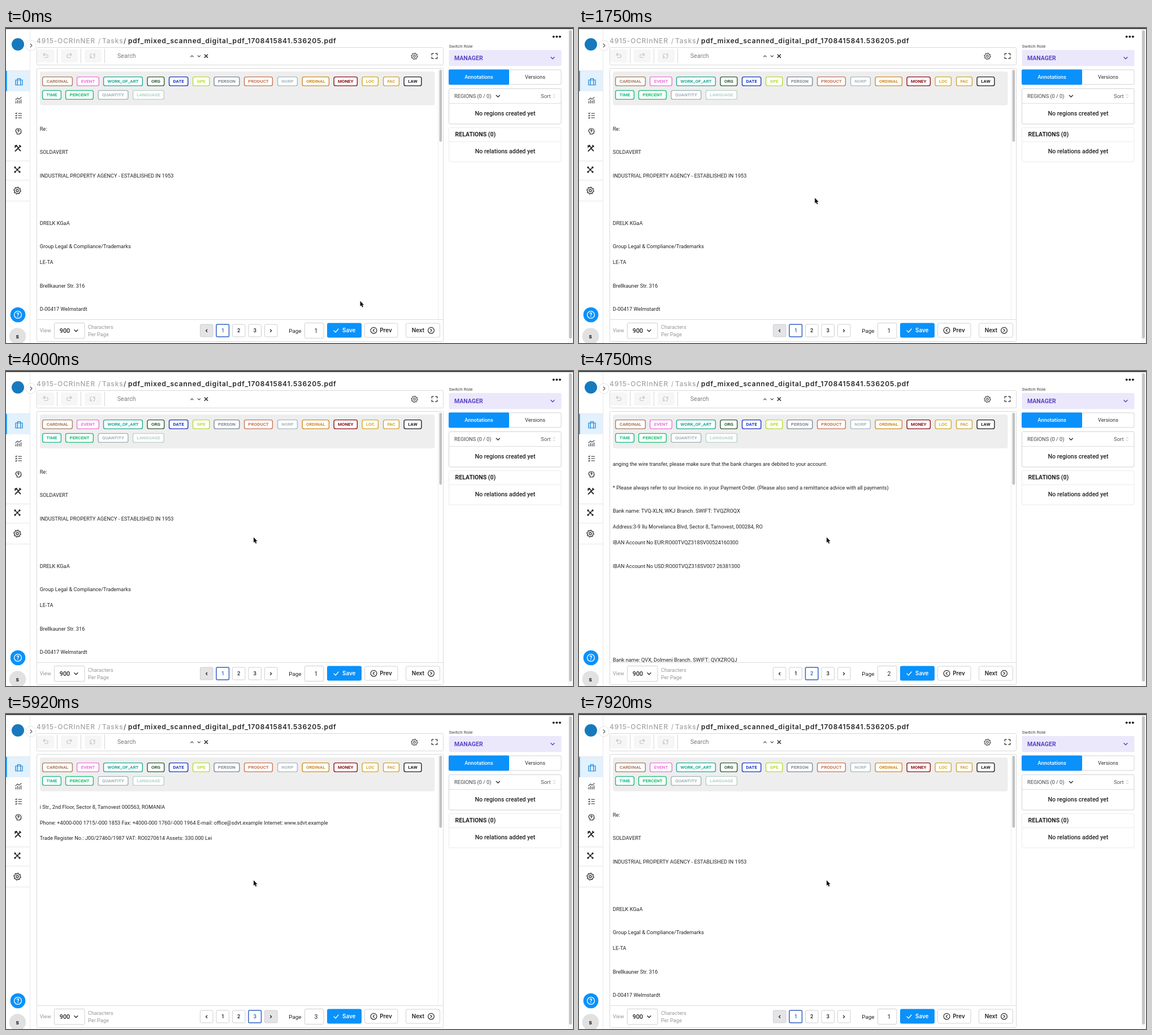
An HTML page that plays this animation: 1003x558 px, repeating every 8000 ms.

```html
<!DOCTYPE html>
<html lang="en">
<head>
<meta charset="utf-8">
<title>Document annotation</title>
<style>
html, body { margin: 0; width: 100%; height: 100%; overflow: hidden; background: #fff; }
svg { display: block; width: 100%; height: 100%; }
text { font-family: Roboto, sans-serif; font-size: 9.23px; fill: #222; white-space: pre; }
.inter { font-family: Inter, sans-serif; }
.crumb { font-size: 12px; letter-spacing: .8px; }
</style>
</head>
<body>
<svg id="stage" viewBox="0 0 1003 558"></svg>
<script>
const LOOP = 8000, FPS = 12;
const BLUE = '#0a91fb', INK = '#25252b';

// Markup helpers
const box = (x, y, w, h, fill = '#fff', stroke = 'none', r = 0, sw = 1, id = '') =>
  `<rect id="${id}" x="${x}" y="${y}" width="${w}" height="${h}" rx="${r}" fill="${fill}" stroke="${stroke}" stroke-width="${sw}"/>`;
const dot = (x, y, r, fill, extra = '') => `<circle cx="${x}" cy="${y}" r="${r}" fill="${fill}" ${extra}/>`;
const line = (d, color = '#dedede', sw = 1) =>
  `<path d="${d}" fill="none" stroke="${color}" stroke-width="${sw}" stroke-linecap="round" stroke-linejoin="round"/>`;
const icon = (x, y, d, color = INK, sw = 1.2) => `<g transform="translate(${x} ${y})">${line(d, color, sw)}</g>`;
const label = (x, y, s, style = '', cls = '', id = '') =>
  `<text id="${id}" x="${x}" y="${y}" class="${cls}" style="${style}">${String(s).replace(/&/g, '&amp;')}</text>`;
const mid = (x, y, s, style = '', cls = '', id = '') => label(x, y, s, 'text-anchor:middle;' + style, cls, id);
const ring = r => `M${-r} 0a${r} ${r} 0 1 0 ${2 * r} 0a${r} ${r} 0 1 0 ${-2 * r} 0`;

const DOWN = 'M-3-1.5 0 1.5 3-1.5', CHECK = 'M-4 0-1 3 4-3';

function gear(x, y, r, color, sw) {
  let d = '';
  for (let i = 0; i < 32; i++) {
    const a = (i + .5) * Math.PI / 16, q = r * (i % 4 < 2 ? 1 : .78);
    d += `${i ? 'L' : 'M'}${(q * Math.cos(a)).toFixed(2)} ${(q * Math.sin(a)).toFixed(2)}`;
  }
  return icon(x, y, d + 'Z' + ring(r * .33), color, sw);
}

function sidebar() {
  const grey = '#55565e';
  return line('M42.5 3V558', '#e9e9ec') +
    box(0, 76, 42, 36, '#e2f1fe') + box(0, 76, 1.6, 36, BLUE) +
    line('M0 75.5H42M0 235.5H42M0 269.5H42M0 306.5H42', '#e6e6e9') +
    dot(21, 29, 11, '#1779bd') +
    dot(44, 31, 9, '#fff', 'stroke="#e2e2e5"') + icon(44.5, 31, 'M-1.5-3 1.5 0-1.5 3', '#555', 1.1) +
    icon(23, 95, 'M-6-3H6V6H-6ZM-2.5-3V-5.5H2.5V-3M-2.7-3V6M2.7-3V6', '#1580d2', 1.2) +
    icon(22, 128, 'M-4.5 5V2M-1.5 5V0M1.5 5V1M4.5 5V-1M-5-1-1.5-4 1-2 5-5', grey, 1.4) +
    icon(22, 155, 'M-5-4-4-3-2.8-4.7M0-3.7H5.5M-5 0-4 1-2.8-.7M0 0H5.5M-5 4-4 5-2.8 3.3M0 4H5.5', INK, 1.1) +
    icon(22, 183, 'M-2.5 5V2.5C-7-1-4-5 0-5C4-5 5-2 4.5 0L5 1.7 4 2V4H2V5ZM0 1V0C2-1 1.5-3 0-3C-1-3-1.5-2-1-1', INK, 1.2) +
    icon(21, 213, 'M-4.5 5 4.5-4M-5-4.5-3-5 0-1.5M1.5 1.5 4.5 4.5M-5-2-2-5M3-5 5-3', INK, 1.8) +
    icon(20, 251, 'M-4-4 0 0 4-4M0 0-4 4M0 0 4 4', INK, 1.1) +
    [[-4, -4], [4, -4], [-4, 4], [4, 4], [0, 0]].map(([x, y]) => dot(20 + x, 251 + y, 1.7, INK)).join('') +
    gear(20, 288, 6.2, INK, 1.2) +
    dot(21, 508, 13.3, BLUE) + dot(21, 508, 6.4, 'none', 'stroke="#fff" stroke-width="1.3"') +
    mid(21, 511.6, '?', 'font-size:10px;font-weight:700;fill:#fff') +
    dot(20.5, 546, 14.8, '#e1e1e1') + mid(20.3, 550, 's', 'font-size:10.5px;font-weight:700');
}

function toolbar() {
  const pale = '#c3c3c6';
  return label(54, 27, '4915-OCRInNER', 'fill:#a3a3a8;font-weight:500', 'inter crumb') +
    label(163, 27, '/', 'fill:#a3a3a8', 'inter crumb') +
    label(170, 27, 'Tasks', 'fill:#a3a3a8;font-weight:500', 'inter crumb') +
    label(208, 27, '/', 'fill:#333', 'inter crumb') +
    label(216, 27, 'pdf_mixed_scanned_digital_pdf_1708415841.536205.pdf', 'fill:#26262b;font-weight:600', 'inter crumb') +
    box(54.5, 34.5, 719, 31, '#fff', '#d9d9db', 2) +
    [55.5, 97, 139].map(x => box(x, 38, 30, 23, '#f6f6f7', 'none', 3)).join('') +
    line('M90.5 37V62M132.5 37V62M174.5 37V62', '#d5d5d8') +
    icon(70, 49, 'M-1.5-4.5-4-2-1.5.5M-4-2H1.5a2.7 2.7 0 0 1 0 5.5H-2', pale, 1.1) +
    icon(112, 49, 'M1.5-4.5 4-2 1.5.5M4-2H-1.5a2.7 2.7 0 0 0 0 5.5H2', pale, 1.1) +
    icon(153, 49.5, 'M-1-4C-5-3-5 2-2 3.5M-4.2 3.5H-2V1.2M1 4C5 3 5-2 2-3.5M4.2-3.5H2V-1.2', pale, 1.1) +
    label(197, 53.3, 'Search', 'font-size:10.6px;fill:#7b7b80') +
    icon(329, 50, 'M-2.2 1.1 0-1.1 2.2 1.1', '#444', 1.2) +
    icon(341.5, 50, 'M-2.2-1.1 0 1.1 2.2-1.1', '#444', 1.2) +
    icon(354, 49.7, 'M-2.7-2.7 2.7 2.7M2.7-2.7-2.7 2.7', '#333', 1.5) +
    gear(722.5, 50, 5.6, '#444', 1.1) +
    icon(758, 49.7, 'M-4.7-1.7V-4.5H-1.7M1.7-4.5H4.7V-1.7M4.7 1.7V4.5H1.7M-1.7 4.5H-4.7V1.7', '#333', 1.3);
}

// Label, left edge, width, colour
const TAGS = [
  [['CARDINAL', 64, 54, '#a77c61'], ['EVENT', 125, 40, '#ec74d9'], ['WORK_OF_ART', 172, 70, '#20a996'],
   ['ORG', 249.5, 31, '#315c37'], ['DATE', 288, 34.5, '#1936c4'], ['GPE', 330, 30.5, '#b6dc30'],
   ['PERSON', 367.5, 46, '#7d8995'], ['PRODUCT', 421, 51, '#c87553'], ['NORP', 480, 36, '#a9b8be'],
   ['ORDINAL', 523.5, 48.5, '#cf8b22'], ['MONEY', 579.5, 42.5, '#8c1016'], ['LOC', 629.5, 29.5, '#d2aa22'],
   ['FAC', 667, 29, '#cfa236'], ['LAW', 703.5, 32, '#202026']],
  [['TIME', 64, 34, '#18b988'], ['PERCENT', 105, 50, '#17c071'], ['QUANTITY', 162.5, 54, '#a1b1b7'],
   ['LANGUAGE', 224, 56, '#b7d2c8']]
];

const tags = () => box(60, 77, 698.5, 60, '#eeeeee', 'none', 4) +
  TAGS.map((row, i) => row.map(([name, x, w, color]) =>
    box(x + .6, 86.6 + 24 * i, w - 1.2, 15.8, '#fff', color, 3, 1.4) +
    mid(x + w / 2, 97.4 + 24 * i, name, `font-size:8px;font-weight:700;fill:${color}`)).join('')).join('');

// Row number and text for every page
const PAGES = [
  [[1, 'Re:'], [4, 'SOLDAVERT'], [7, 'INDUSTRIAL PROPERTY AGENCY - ESTABLISHED IN 1953'], [13, 'DRELK KGaA'],
   [16, 'Group Legal & Compliance/Trademarks'], [18, 'LE-TA'], [21, 'Brellkauner Str. 316'], [24, 'D-00417 Welmstardt']],
  [[0, 'anging the wire transfer, please make sure that the bank charges are debited to your account.'],
   [3, '* Please always refer to our Invoice no. in your Payment Order. (Please also send a remittance advice with all payments)'],
   [6, 'Bank name: TVQ-XLN, WKJ Branch. SWIFT: TVQZROQX'],
   [8, 'Address:3-9 Ilu Morvelanca Blvd, Sector 8, Tarnovest, 000284, RO'],
   [10, 'IBAN Account No EUR:RO00TVQZ318SV00524160300'],
   [13, 'IBAN Account No USD:RO00TVQZ318SV007 26381300'],
   [25, 'Bank name: QVX, Dolmeni Branch. SWIFT: QVXZROQJ']],
  [[0, 'i Str., 2nd Floor, Sector 8, Tarnovest 000563, ROMANIA'],
   [2, 'Phone: +4000-000 1715/-000 1853 Fax: +4000-000 1760/-000 1964 E-mail: office@sdvt.example Internet: www.sdvt.example'],
   [4, 'Trade Register No.: J00/27460/1987 VAT: RO0270614 Assets: 330.000 Lei']]
];

const pages = () => PAGES.map((rows, i) => `<g id="page${i + 1}" clip-path="url(#view)">` +
  rows.map(([n, s]) => label(59.7, (167.8 + 13.9 * n).toFixed(1), s)).join('') + '</g>').join('');

function viewer() {
  return box(54.5, 71.5, 719, 484, '#fff', '#d9d9db', 2) + tags() + pages() +
    line('M764.5 72V516', '#eeeeee') + box(766.5, 74, 4.6, 127.5, '#c2c2c4', 'none', 2.3);
}

// Buttons 0 and 4 are the previous and next arrows
function pagerButton(n) {
  const x = 343.5 + 28.5 * n, cx = x + 11.2;
  const face = n % 4
    ? mid(cx, 539.2, n, 'font-size:8.6px;font-weight:600', 'inter', 'num' + n)
    : icon(cx, 536.2, n ? 'M-1-2 1 0-1 2' : 'M1-2-1 0 1 2', '#222', 1.3);
  return box(x, 525, 22.5, 22, '#fff', '#cfcfd3', 2, 1, 'btn' + n) + face;
}

function footer() {
  const grey = 'fill:#97979c', bold = 'font-size:9.9px;font-weight:600';
  return line('M55 516.5H773', '#dcdcde') +
    label(59.7, 539.4, 'View', grey) +
    box(85.5, 522.5, 53.5, 27.5, '#fff', '#cfcfd3', 2) + label(94.8, 540, '900', 'font-size:10.8px;font-weight:500') +
    icon(124, 536.3, DOWN, '#333', 1.5) +
    label(145, 533, 'Characters', grey) + label(145, 546, 'Per Page', grey) +
    [0, 1, 2, 3, 4].map(pagerButton).join('') +
    label(500.3, 539.5, 'Page', 'font-size:9.8px') +
    box(528.5, 522.5, 33.5, 27, '#fff', '#cfcfd3', 2) +
    mid(548.5, 540, 1, 'font-size:10.6px', '', 'current') +
    box(568, 522.5, 61, 26, BLUE, 'none', 3) + icon(584, 536, CHECK, '#fff', 1.3) +
    label(595, 539.3, 'Save', bold + ';fill:#fff', 'inter') +
    box(634.5, 523, 58.5, 25, '#fff', '#d2d2d6', 3) +
    icon(650.5, 535.7, ring(5.4) + 'M1-2.2-1.2 0 1 2.2', INK, 1.2) + label(661.2, 539.3, 'Prev', bold, 'inter') +
    box(707.5, 523, 60, 25, '#fff', '#d2d2d6', 3) +
    label(717.7, 539.3, 'Next', bold, 'inter') + icon(752, 535.7, ring(5.4) + 'M-1-2.2 1.2 0-1 2.2', INK, 1.2);
}

function panel() {
  const head = 'font-size:10.6px;font-weight:500', violet = '#5a45c4';
  return [968.7, 974.3, 979.9].map(x => dot(x, 15.3, 1.9, '#111')).join('') +
    label(783.5, 35.3, 'Switch Role', 'font-size:8.1px;fill:#444') +
    box(783.5, 39, 199, 28.5, '#ebe8fc', 'none', 2) +
    label(793, 56.8, 'MANAGER', `font-size:10.5px;font-weight:600;fill:${violet}`) +
    icon(967, 53.3, DOWN, violet, 1.5) +
    box(783.5, 74, 198.5, 26, '#fff', '#d2d2d6', 2) + box(783, 73.5, 107, 27, BLUE, 'none', 2) +
    mid(836.6, 90.3, 'Annotations', 'font-size:9.3px;font-weight:500;fill:#fff') +
    mid(936, 90.3, 'Versions', 'font-size:9.3px;fill:#333') +
    box(783.5, 107.5, 198.5, 62.5, '#fff', '#d2d2d6', 2) + line('M784 133.5H982', '#dedee1') +
    label(793, 123.8, 'REGIONS (0 / 0)', 'fill:#444') + icon(870.3, 120.7, DOWN, '#333', 1.5) +
    label(946, 123.8, 'Sort', 'font-size:9.5px;fill:#555') +
    icon(969.7, 120.5, 'M-1.5-1.5 0-3 1.5-1.5M-1.5 1.5 0 3 1.5 1.5', '#aaa', .8) +
    mid(883, 155.2, 'No regions created yet', head) +
    box(783.5, 176.5, 198.5, 60.5, '#fff', '#ebebed', 2) + line('M784 201.5H982', '#ebebed') +
    label(794.6, 191.8, 'RELATIONS (0)', 'font-size:10.5px;font-weight:600') +
    mid(883, 222.2, 'No relations added yet', head);
}

const stage = document.getElementById('stage');
stage.innerHTML = '<defs><clipPath id="view"><rect x="55" y="137" width="710" height="379"/></clipPath></defs>' +
  box(0, 0, 1003, 558) + sidebar() + toolbar() + viewer() + footer() + panel() +
  box(994, 2, 9, 556, '#f8f8f8') + box(996, 4, 5, 546, '#c4c4c6', 'none', 2.5) +
  box(0, 0, 1003, 1.8, '#38383b') +
  '<path id="cursor" d="M0 0V9.6L2.1 7.7 3.7 11.2 5.4 10.4 3.8 7H6.7Z" fill="#111" stroke="#fff" stroke-width="1" paint-order="stroke"/>';

const get = id => document.getElementById(id);
const attr = (id, name, value) => get(id).setAttribute(name, value);

// Cursor stops: step, x, y, easing towards the stop
const smooth = u => u * u * (3 - 2 * u), linear = u => u, easeOut = u => u * (2 - u);
const STOPS = [[0, 626.5, 483.5], [10, 236, 335, smooth], [13, 278, 323.5, linear], [20, 401, 306, linear], [24, 438, 294.5, easeOut]];

function cursorAt(step) {
  const i = STOPS.findIndex(s => s[0] > step);
  if (i < 0) return STOPS[STOPS.length - 1].slice(1, 3);
  const [a, ax, ay] = STOPS[i - 1], [b, bx, by, ease] = STOPS[i];
  const u = ease((step - a) / (b - a));
  return [ax + (bx - ax) * u, ay + (by - ay) * u];
}

const pageAt = step => step < 57 ? 1 : step < 64 ? 2 : step < 86 ? 3 : step < 90 ? 2 : 1;

function draw(t) {
  const step = Math.floor((t + 4) * FPS / 1000), page = pageAt(step);
  const [x, y] = cursorAt(step);
  attr('cursor', 'transform', `translate(${x.toFixed(1)} ${y.toFixed(1)})`);
  for (let n = 1; n <= 3; n++) {
    const on = n === page;
    attr('page' + n, 'visibility', on ? 'visible' : 'hidden');
    attr('btn' + n, 'stroke', on ? '#2f62c4' : '#cfcfd3');
    attr('btn' + n, 'stroke-width', on ? 1.5 : 1);
    get('num' + n).style.fill = on ? '#2f62c4' : '#222';
  }
  attr('btn0', 'fill', page === 1 ? '#e4e4e6' : '#fff');
  attr('btn4', 'fill', page === 3 ? '#e4e4e6' : '#fff');
  get('current').textContent = page;
}

const start = performance.now();
function tick() {
  draw((performance.now() - start) % LOOP);
  requestAnimationFrame(tick);
}
tick();
</script>
</body>
</html>
```
